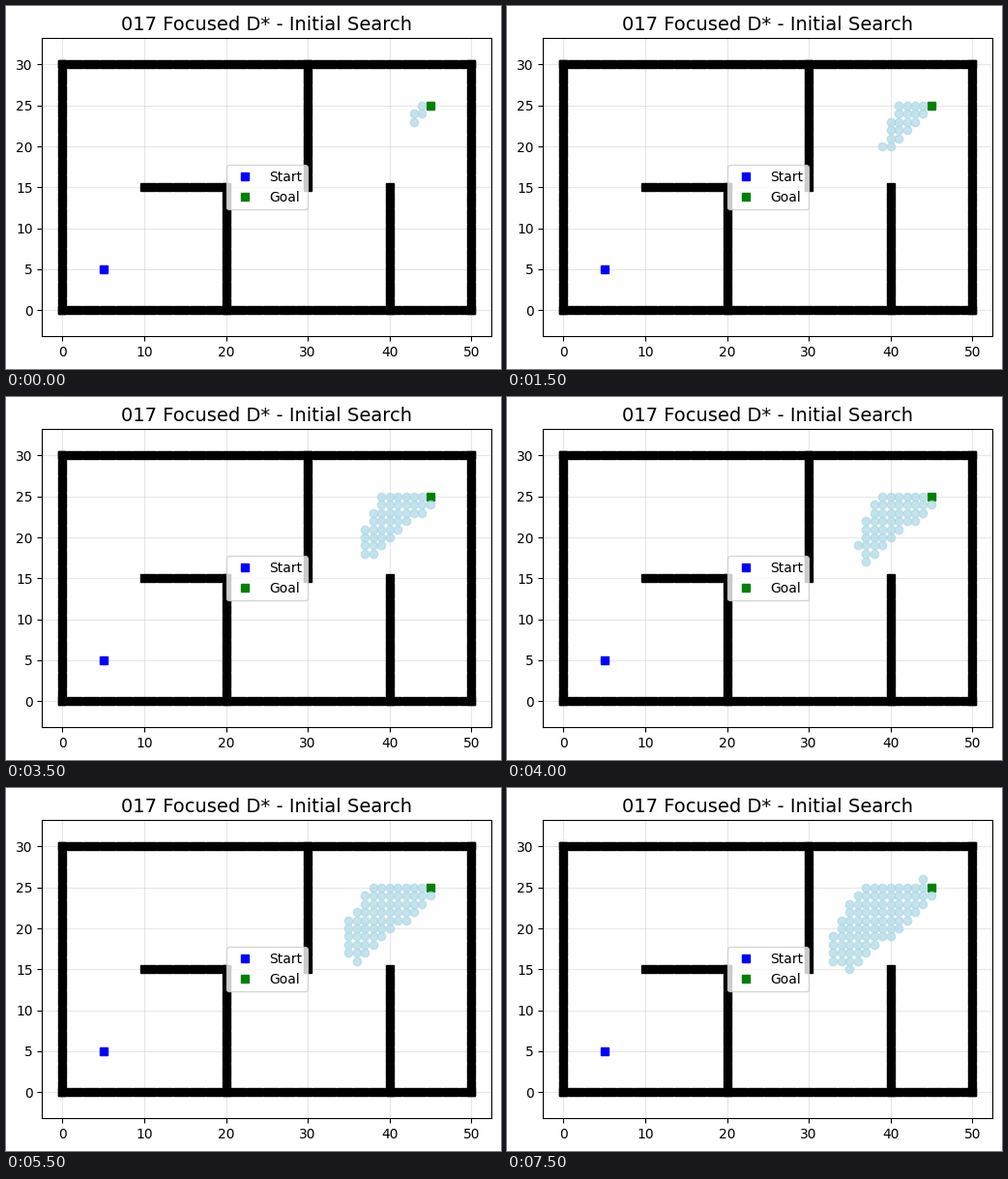
Animation of 512 by 375 pixels, one loop 8000 ms. Source, as a matplotlib script:

```python
import math

import matplotlib.pyplot as plt
from matplotlib.animation import FuncAnimation

START, GOAL = (5, 5), (45, 25)
W, H = 512, 375
FRAMES, INTERVAL = 16, 500
CELLS_PER_FRAME = 5


def make_walls():
    border = [(x, y) for x in range(51) for y in (0, 30)]
    border += [(x, y) for x in (0, 50) for y in range(31)]
    inner = [(x, 15) for x in range(10, 21)]
    inner += [(20, y) for y in range(16)]
    inner += [(30, y) for y in range(15, 31)]
    inner += [(40, y) for y in range(16)]
    return border + inner


def cost(cell):
    """Octile distance from the goal plus straight distance to the start."""
    dx, dy = abs(cell[0] - GOAL[0]), abs(cell[1] - GOAL[1])
    octile = max(dx, dy) + (math.sqrt(2) - 1) * min(dx, dy)
    return octile + math.dist(cell, START)


# In the open upper right room the search expands cells in order of cost.
room = [(x, y) for x in range(31, 50) for y in range(11, 30)]
expanded = sorted(room, key=cost)

fig = plt.figure(figsize=(W / 100, H / 100), dpi=100)
ax = fig.add_axes([37 / W, 34 / H, 465 / W, 308 / H])
ax.plot(*zip(*make_walls()), "ks")
ax.plot(*START, "bs", label="Start")
ax.plot(*GOAL, "gs", label="Goal")
ax.grid(True, alpha=0.3)
ax.axis("equal")
ax.set_title("017 Focused D* - Initial Search", fontsize=14)
ax.legend(loc="center")
visited, = ax.plot([], [], "o", color="lightblue", alpha=0.7)

# Keep a 0.1 inch margin left of and below the tick labels.
tight = fig.get_tightbbox()
box = ax.get_position()
ax.set_position([box.x0 + (0.1 - tight.x0) * 100 / W,
                 box.y0 + (0.1 - tight.y0) * 100 / H,
                 box.width, box.height])


def update(i):
    cells = expanded[:CELLS_PER_FRAME * (i + 1)]
    visited.set_data(*zip(*(c for c in cells if c != GOAL)))
    return visited,


anim = FuncAnimation(fig, update, frames=FRAMES, interval=INTERVAL,
                     repeat=True, repeat_delay=0)
plt.show()
```
